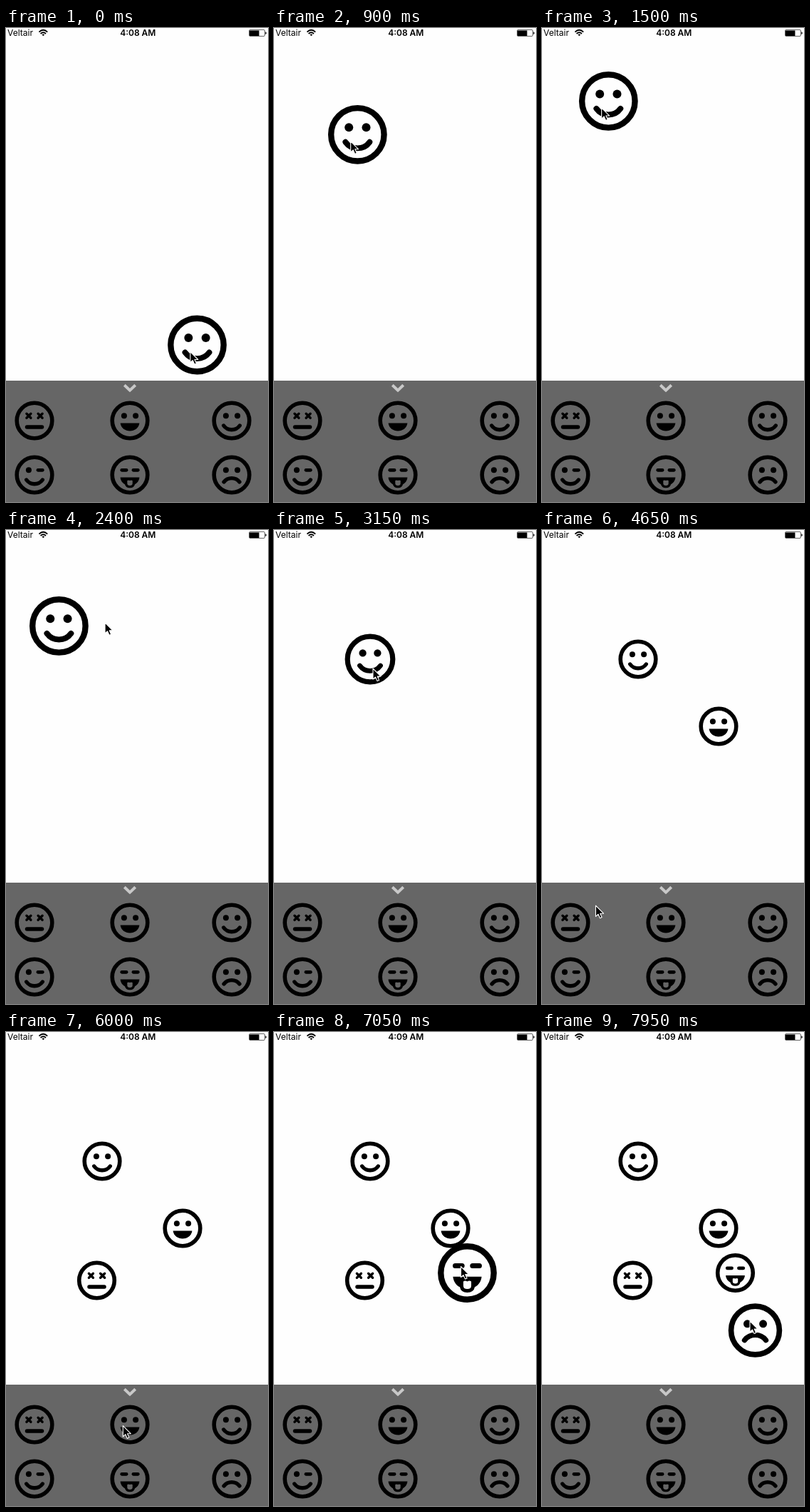
An HTML page for the animation above (8000 ms loop, 368 by 664 pixels).

```html
<!DOCTYPE html>
<html lang="en">
<head>
<meta charset="utf-8">
<title>Emoji canvas</title>
<style>
  html, body { margin: 0; width: 100%; height: 100%; overflow: hidden; background: #fefefe; }
  svg { display: block; width: 100%; height: 100%; }
  text { font: 12px Inter, "Liberation Sans", sans-serif; }
  .line { fill: none; stroke: #000; stroke-width: 5.3; stroke-linecap: round; }
</style>
</head>
<body>
<svg viewBox="0 0 368 664">
  <defs>
    <circle id="ring" r="24.8" fill="none" stroke="#000" stroke-width="5.6"/>
    <circle id="dot" cy="-6.7" r="4"/>
    <path id="dash" class="line" style="stroke-width:4.7" d="M-3.2-6.7H3.2"/>
    <path id="cross" class="line" style="stroke-width:3.4" d="M-3-9.7l6 6m0-6l-6 6"/>
    <path id="smileMouth" class="line" d="M-11.3 7A14 14 0 0 0 11.3 7"/>
    <path id="grinMouth" d="M-13.4 3.5H13.4C12.5 10.7 6.5 14.4 0 14.4S-12.5 10.7-13.4 3.5Z"/>
    <path id="deadMouth" class="line" d="M-10.6 9H10.6"/>
    <path id="tongueMouth" fill-rule="evenodd" d="M-13.4 3.5H13.4C13 8 10.5 11.5 7 13.2Q6 18.3 0 18.3T-7 13.2C-10.5 11.5-13 8-13.4 3.5ZM-3.7 8V12Q-3.7 15 0 15T3.7 12V8Q2 6.8 0 8Q-2 6.8-3.7 8Z"/>
    <path id="sadMouth" class="line" d="M-11 10A14 14 0 0 1 11 10"/>
  </defs>

  <text x="2" y="11.3">Veltair</text>
  <g fill="none" stroke="#000" stroke-width="1.8">
    <path d="M46.4 5.6Q52.3 0 58.2 5.6M48.6 8Q52.3 4.6 56 8"/>
    <path d="M50.4 9.2Q52.3 7.6 54.2 9.2L52.3 11.2Z" fill="#000" stroke="none"/>
  </g>
  <text id="clock" x="185.3" y="11.3" text-anchor="middle" style="font-weight:600"></text>
  <rect x="341.5" y="2.5" width="22" height="9" rx="1.5" fill="none" stroke="#666"/>
  <rect x="342" y="3.5" width="13.5" height="7.5"/>
  <path d="M364.3 5.2q1.6.3 1.6 1.9t-1.6 1.9z"/>

  <rect y="494" width="368" height="170" fill="#666"/>
  <path d="M166.3 500.2L174 507.6L181.7 500.2" fill="none" stroke="#c8c8c8" stroke-width="4"/>
  <g id="faces"></g>
  <path id="cursor" d="M0 0V15.2L3.5 12L6 17.6L8.6 16.4L6.2 11H11Z" stroke="#fff" stroke-width="1.1" stroke-linejoin="round"/>
</svg>
<script>
const STEP = 150, LOOP = 8000;
const PEAK = 1.5, GROW = 340, SHRINK = 230;   // size of a held face, and how fast it changes
const LINGER = 100, PAUSE = 230, BOW = 8;     // pointer rests after a drop and before a press
const $ = id => document.getElementById(id);

const clamp = p => Math.max(0, Math.min(1, p));
const smooth = p => p * p * (3 - 2 * p);
const easeOut = p => 1 - (1 - p) ** 2.5;
const mix = (a, b, p) => a.map((v, i) => v + (b[i] - v) * p);
const add = (a, b, k = 1) => a.map((v, i) => v + b[i] * k);

// kind: left eye, right eye, in tray order
const eyes = {
  dead: ['cross', 'cross'], grin: ['dot', 'dot'], smile: ['dot', 'dot'],
  wink: ['dot', 'dash'], tongue: ['dash', 'dash'], sad: ['dot', 'dot']
};
const kinds = Object.keys(eyes);

function home(kind) {
  const i = kinds.indexOf(kind);
  return [[40, 174, 317][i % 3], i < 3 ? 550 : 626];
}

function addFace(kind) {
  const face = document.createElementNS('http://www.w3.org/2000/svg', 'g');
  const mouth = kind === 'wink' ? 'smile' : kind;
  face.innerHTML = `<use href="#ring"/><use href="#${eyes[kind][0]}" x="-8.1"/>
    <use href="#${eyes[kind][1]}" x="8.1"/><use href="#${mouth}Mouth"/>`;
  $('faces').append(face);
  return face;
}

function place(el, [x, y], scale = 1) {
  el.setAttribute('transform', `translate(${x} ${y}) scale(${scale})`);
}

// Each drag carries a face from the tray, or from a given point, to its place.
// grip: pointer offset from the face; sway: side swing; lead: pointer running ahead.
const drags = [
  { kind: 'smile', press: 0, release: 1650, from: [268.5, 444], to: [92.9, 101.6], grip: [-9.7, 9.5], held: true },
  { kind: 'smile', press: 2000, release: 3050, from: [92.9, 101.6], to: [135, 181], grip: [4, 13],
    sway: [-29, 13], lead: [86, -25], ease: p => p ** 1.44 },
  { kind: 'grin', press: 3980, release: 4350, to: [248, 275], grip: [5, 3] },
  { kind: 'dead', press: 4930, release: 5400, to: [127.5, 348], grip: [12, 5] },
  { kind: 'tongue', press: 6470, release: 7050, to: [271.5, 337.5], grip: [-9, -9] },
  { kind: 'sad', press: 7700, release: 7950, to: [299.5, 418], grip: [-7.5, -13] }
].map(d => ({ sway: [0, 0], lead: [0, 0], ease: easeOut, ...d }));

const origin = d => d.from || home(d.kind);
const progress = (d, t) => d.ease(clamp((t - d.press) / (d.release - d.press)));

function facePosition(d, t) {
  const p = progress(d, t);
  return add(mix(origin(d), d.to, p), d.sway, Math.sin(2 * Math.PI * p));
}

function faceScale(d, t) {
  const grown = d.from ? 1 : clamp((t - d.press) / GROW);
  const shrunk = d.held ? 0 : clamp((t - d.release) / SHRINK);
  return 1 + (PEAK - 1) * grown * (1 - shrunk);
}

function pointerPosition(t) {
  const i = drags.findLastIndex(d => d.press <= t);
  const drag = drags[i], next = drags[i + 1];
  const leave = drag.release + LINGER;
  if (t <= leave || !next) {
    const held = add(facePosition(drag, t), drag.grip);
    return add(held, drag.lead, Math.sin(Math.PI * progress(drag, t)));
  }
  const p = smooth(clamp((t - leave) / (next.press - PAUSE - leave)));
  const path = mix(add(drag.to, drag.grip), add(origin(next), next.grip), p);
  return add(path, [BOW, 0], Math.sin(Math.PI * p));
}

kinds.forEach(kind => place(addFace(kind), home(kind)));
const actors = [...new Set(drags.map(d => d.kind))].map(kind => ({ kind, el: addFace(kind) }));

function draw(now) {
  const t = Math.floor(now % LOOP / STEP) * STEP;
  for (const { kind, el } of actors) {
    const drag = drags.findLast(d => d.kind === kind && d.press <= t);
    el.style.display = drag ? '' : 'none';
    if (drag) place(el, facePosition(drag, t), faceScale(drag, t));
  }
  place($('cursor'), pointerPosition(t));
  $('clock').textContent = t < 7050 ? '4:08 AM' : '4:09 AM';
}

const start = performance.now();
function tick() {
  draw(Math.max(0, performance.now() - start));
  requestAnimationFrame(tick);
}
tick();
</script>
</body>
</html>
```
